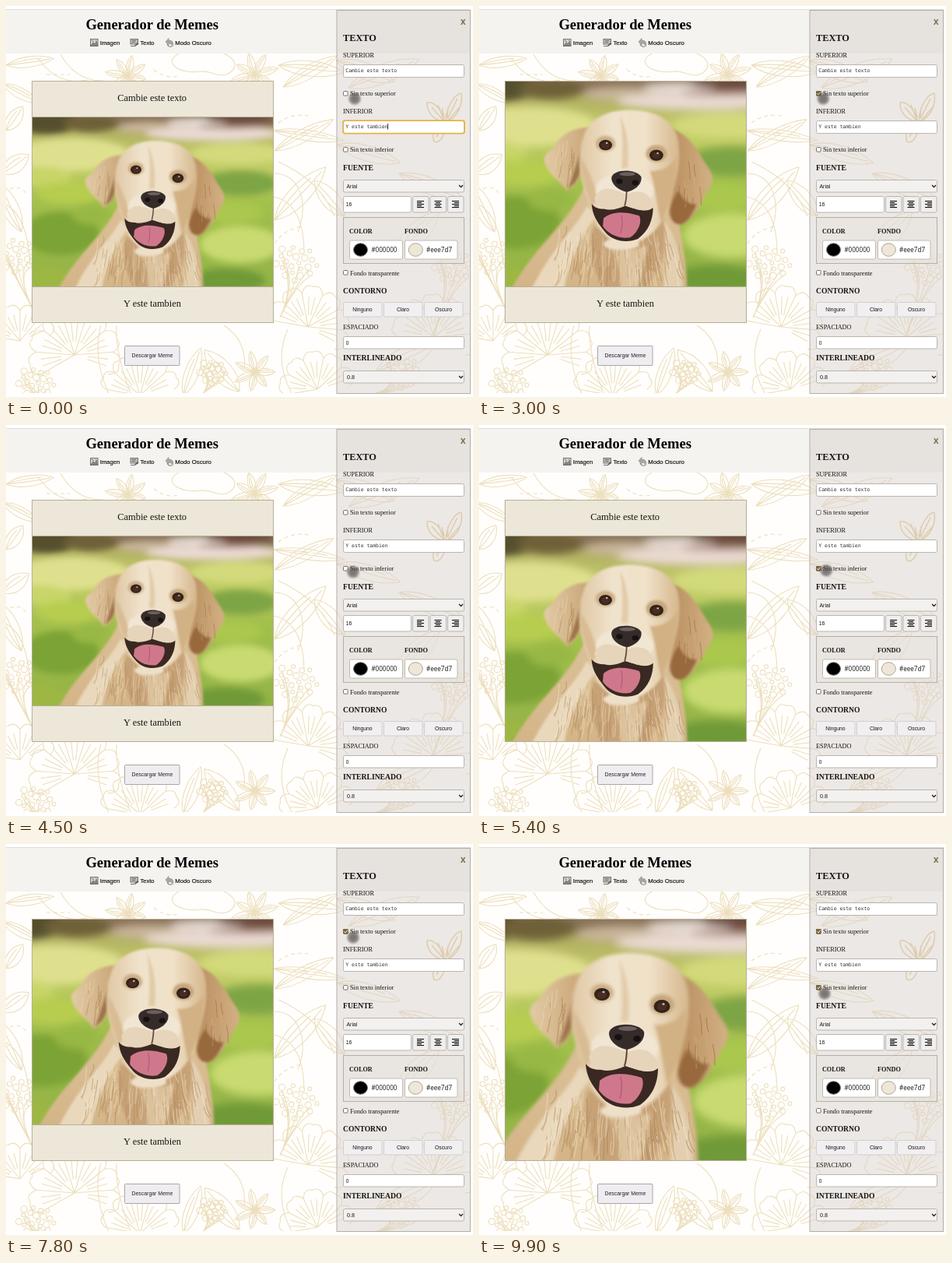
Recreate the animation shown at these times as an HTML page. Size 600 px wide and 502 px high, loop 10 s.

```html
<!DOCTYPE html>
<html lang="es">
<head>
<meta charset="utf-8">
<title>Generador de Memes</title>
<style>
html, body { margin: 0; width: 100%; height: 100%; overflow: hidden; background: #fff; }
#stage { display: block; width: 600px; height: 502px; }
.serif { font-family: "Liberation Serif", "Times New Roman", serif; }
.sans { font-family: "Liberation Sans", Arial, sans-serif; }
.mono { font-family: "DejaVu Sans Mono", monospace; }
.hex { font-family: "Open Sans", sans-serif; }
.wide { font-family: "DejaVu Sans", sans-serif; }
.bold { font-weight: bold; }
.mid { text-anchor: middle; }
</style>
</head>
<body>
<svg id="stage" viewBox="0 0 600 502" xmlns="http://www.w3.org/2000/svg"></svg>
<script>
const LOOP = 10000;
let seed = 11;
const rnd = () => (seed = (seed * 16807) % 2147483647) / 2147483647;
const fx = v => v.toFixed(1);

const text = (x, y, size, str, cls = "serif", fill = "#161514") =>
  `<text x="${x}" y="${y}" font-size="${size}" class="${cls}" fill="${fill}">${str}</text>`;
const box = (x, y, w, h, fill, line = "none", r = 0) =>
  `<rect x="${x}" y="${y}" width="${w}" height="${h}" rx="${r}" fill="${fill}" stroke="${line}"/>`;
const oval = (x, y, rx, ry, fill, more = "") =>
  `<ellipse cx="${x}" cy="${y}" rx="${rx}" ry="${ry}" fill="${fill}" ${more}/>`;
const path = (d, fill, more = "") => `<path d="${d}" fill="${fill}" ${more}/>`;

// ---- floral wallpaper -------------------------------------------------
function leaf(x, y, len, w, deg) {
  const a = deg * Math.PI / 180, c = Math.cos(a), s = Math.sin(a);
  const p = (u, v) => fx(x + u * c - v * s) + " " + fx(y + u * s + v * c);
  return `M${p(0, 0)}C${p(len * .25, -w)} ${p(len * .7, -w)} ${p(len, 0)}` +
    `C${p(len * .7, w)} ${p(len * .25, w)} ${p(0, 0)}Q${p(len * .5, w * .15)} ${p(len * .92, 0)}` +
    `M${p(0, 0)}Q${p(len * .4, -w * .5)} ${p(len * .75, -w * .25)}`;
}
function star(x, y, r, n, turn) {
  let d = "";
  for (let i = 0; i < n; i++) d += leaf(x, y, r * (.85 + .3 * rnd()), r * .22, turn + i * 360 / n);
  return d;
}
function ring(x, y, r) {
  return `M${fx(x - r)} ${fx(y)}a${r} ${r} 0 1 0 ${2 * r} 0a${r} ${r} 0 1 0 ${-2 * r} 0`;
}
function umbel(x, y, r, bx, by) {
  let d = "";
  for (let i = 0; i < 22; i++) {
    const q = r * Math.sqrt((i + .5) / 22), a = i * 2.4;
    const cx = x + q * Math.cos(a), cy = y + q * Math.sin(a) * .85;
    d += ring(cx, cy, 2.5 + (i % 3) * .8);
    if (i % 4 === 0) d += `M${fx(cx)} ${fx(cy + 4)}Q${x} ${y + r} ${bx} ${by}`;
  }
  return d;
}
function fan(x, y, r, from, to, n) {
  let d = "";
  const at = (deg, q) => fx(x + q * Math.cos(deg * Math.PI / 180)) + " " + fx(y + q * Math.sin(deg * Math.PI / 180));
  const step = (to - from) / n;
  for (let i = 0; i < n; i++) {
    const a = from + i * step;
    d += `M${x} ${y}L${at(a, r * .85)}Q${at(a + step * .2, r * 1.1)} ${at(a + step / 2, r)}` +
         `Q${at(a + step * .8, r * 1.1)} ${at(a + step, r * .85)}`;
    for (let k = 1; k < 3; k++) d += `M${at(a + step * k / 3, r * .3)}L${at(a + step * k / 3, r * .75)}`;
  }
  return d;
}
function wallpaper() {
  const leaves = [
    [0, 76, 62, 9, -8], [-4, 100, 52, 9, 28], [0, 160, 38, 12, -55], [-5, 215, 42, 14, -35],
    [345, 186, 86, 11, -28], [344, 160, 92, 9, 8], [356, 104, 80, 11, -30], [350, 76, 85, 13, 6],
    [425, 178, 85, 13, 16], [440, 105, 98, 16, -22], [345, 275, 95, 17, -46], [424, 70, 80, 14, 20],
    [505, 215, 90, 14, 22], [20, 290, 70, 14, -115], [500, 320, 80, 18, -45], [228, 500, 65, 12, -70],
    [300, 495, 70, 17, -130], [435, 270, 60, 15, -130], [475, 470, 85, 18, -25]
  ];
  let d = leaves.map(l => leaf(...l)).join("");
  d += star(157, 90, 27, 8, 10) + star(319, 88, 29, 8, 30) + star(320, 470, 27, 7, 0);
  d += umbel(12, 320, 27, 40, 400) + umbel(372, 330, 28, 352, 400) + umbel(38, 484, 24, 70, 502) +
       umbel(574, 335, 26, 545, 430) + umbel(508, 470, 25, 460, 500) + umbel(265, 470, 18, 250, 500);
  d += fan(88, 448, 58, 150, 390, 7) + fan(388, 412, 52, 190, 400, 6) + fan(172, 500, 52, 190, 350, 5) +
       fan(400, 492, 48, 170, 355, 5) + fan(550, 425, 54, 180, 390, 6) + fan(18, 430, 46, 190, 350, 4);
  d += "M222 61c-22 12 2 27 28 23 12-2 25 10 37 2s8-18-7-25M70 62q20 35 55 34M42 68q25 35 62 27" +
       "M345 215c32 0 45 38 30 75M350 200q55 25 72 70M344 245q38 8 39 70M0 255q28 15 31 78" +
       "M122 410q-12 42 12 92M142 410q-2 37 20 92M280 410q30 20 26 55M362 415q-18 40 5 82";
  const wings = "M563 147C560 131 548 122 541 124C541 136 547 145 563 149C552 153 546 164 550 174" +
    "C558 178 565 163 565 152M565 147C566 130 576 113 585 112C587 126 582 140 567 149" +
    "C577 147 585 153 582 160C575 166 567 159 566 151M563 143l-3-12M567 143l1-13" +
    "M562 147L547 130M562 145L555 127M567 145L580 119M568 147L583 130M563 152L553 168M568 151L578 157";
  const dash = "M52 88h30M190 82q15 12 32 8M350 150q20-14 42-8M345 305q12-18 35-22M5 235q15-6 22 8";
  return `<g fill="none" stroke="#eddfbd" stroke-width="1.1" stroke-linejoin="round">` +
    `<path d="${d}"/><path d="${dash}" stroke-dasharray="5 4"/>` +
    `<path d="${wings}" stroke="#e3cc95" stroke-width="1.5"/></g>`;
}

// ---- photo --------------------------------------------------------------
function strands(n, x0, y0, w, h, lean, colors) {
  let s = "";
  for (let i = 0; i < n; i++) {
    const x = x0 + rnd() * w, y = y0 + rnd() * h, l = 16 + rnd() * 26;
    s += path(`M${fx(x)} ${fx(y)}q${fx((rnd() - .5) * 8)} ${fx(l / 2)} ${fx((x - 175) * lean)} ${fx(l)}`, "none",
      `stroke="${colors[i % colors.length]}"`);
  }
  return s;
}
function photo() {
  const yard =
    box(-60, 90, 500, 325, "url(#grass)") +
    `<g filter="url(#far)">` +
    box(-60, 82, 500, 34, "#8a7359") + oval(-5, 104, 60, 24, "#55502f") + oval(75, 108, 50, 16, "#6e6138") +
    oval(185, 116, 60, 10, "#c9b69a") + oval(300, 127, 125, 13, "#eadad2") + oval(270, 107, 55, 7, "#e9ded6") +
    oval(350, 99, 65, 9, "#67453a") + oval(330, 114, 60, 4, "#9a7466") +
    oval(40, 165, 105, 30, "#dfe08e") + oval(-20, 205, 60, 18, "#c8d567") +
    oval(345, 163, 85, 19, "#d3da7c") + oval(350, 218, 70, 23, "#7ea545") +
    oval(35, 235, 60, 20, "#b7cd50") + oval(330, 272, 60, 20, "#aac84e") +
    oval(20, 310, 70, 40, "#7ba336") + oval(350, 330, 75, 34, "#c8da70") +
    oval(75, 275, 35, 18, "#98b844") + oval(325, 396, 70, 22, "#6f9a37") + oval(-20, 392, 55, 25, "#9cb743") +
    `</g>`;
  const coat =
    `<g filter="url(#near)">` +
    path("M128 252C112 292 78 325 48 362Q30 384 14 414H281C283 380 273 330 264 285L200 250Z", "url(#coat)") +
    path("M130 285C112 322 75 350 45 414H95C100 370 125 320 146 300Z", "#e9d8bb") +
    path("M140 315C130 355 140 390 160 412H215C250 380 250 335 246 300Q200 350 140 315Z", "#c7a277") +
    path("M165 345Q185 385 180 412H205Q220 375 220 345Q190 358 165 345Z", "#dcc29c") +
    path("M246 305Q275 345 275 412H245Q254 360 246 305Z", "#e3cfb0") +
    path("M137 166C106 166 87 180 79 198C68 204 62 212 67 222C74 241 89 246 99 262C113 258 126 235 131 210Z", "url(#earL)") +
    path("M257 168C285 176 299 204 312 225C323 241 322 249 312 264C300 287 286 313 270 314C252 312 250 286 257 262C264 230 258 200 257 168Z", "url(#earR)") +
    path("M124 190Q128 225 112 250L101 260Q112 228 124 190Z", "#9f7449") +
    path("M268 262Q280 285 296 282Q284 312 270 313C252 312 252 286 268 262Z", "#98693d") +
    `</g>` +
    `<g stroke-width="1.3" fill="none" opacity=".5" filter="url(#soft)">` +
    strands(150, 85, 315, 185, 70, .08, ["#f4e7d0", "#a77f51", "#ead7b8", "#bd9464"]) +
    strands(14, 268, 205, 36, 70, .02, ["#986a3b", "#d2aa78"]) +
    strands(12, 82, 185, 34, 40, .05, ["#a67b4b", "#eed8b8"]) + `</g>`;
  const face =
    `<g filter="url(#near)">` +
    path("M127 173C140 149 165 139 200 140C235 142 262 155 268 185C274 220 264 250 255 285C246 312 225 338 190 345C160 340 142 318 135 285C121 255 115 225 120 195Z", "url(#face)") +
    path("M180 148Q196 180 192 228H182Q186 185 180 148Z", "#e2cba8") +
    path("M225 232C245 234 262 222 265 208C268 250 255 285 242 310C234 276 233 252 225 232Z", "#d2b184") +
    path("M121 212Q138 238 146 272L138 288Q119 240 121 212Z", "#d9bc93") +
    oval(187, 262, 44, 27, "#f1e6d3") + oval(182, 343, 27, 9, "#eee0c8") +
    oval(158, 191, 15, 12, "#cdae86") + oval(235, 206, 16, 13, "#c6a67c") +
    `</g><g filter="url(#soft)">` +
    path("M137 282C146 294 162 290 186 284C206 291 220 296 230 288C230 306 223 324 207 335C190 342 168 339 156 323C144 308 138 298 137 282Z", "#3a2822") +
    path("M155 304C168 292 190 294 209 300C214 309 207 326 195 333C178 336 161 327 154 316Z", "#cf788c") +
    path("M182 299Q185 312 181 327", "none", 'stroke="#b35c74" stroke-width="1.5"') +
    path("M141 274C150 254 166 257 190 268C215 257 228 270 231 286C216 297 203 289 188 285C170 293 150 296 141 274Z", "#e6d5ba") +
    path("M190 260Q190 275 187 285", "none", 'stroke="#604638" stroke-width="2"') +
    path("M167 243C168 229 204 228 212 241C214 253 201 262 190 264C178 262 167 253 167 243Z", "#352c2a") +
    oval(191, 237, 12, 3, "#6b605d") + oval(179, 248, 5, 4, "#171212") + oval(203, 250, 5, 4, "#171212") +
    oval(158, 193, 10, 8, "#33231b") + oval(235, 208.5, 10.5, 8.5, "#33231b") +
    oval(158, 194, 6, 5, "#482d20") + oval(235, 209, 6, 5, "#482d20") +
    oval(160, 190, 1.6, 1.3, "#c9c5c1") + oval(237, 205.5, 1.6, 1.3, "#c9c5c1") + `</g>`;
  return yard + coat + face;
}
const fade = (id, dir, ...stops) => `<linearGradient id="${id}" ${dir}>` +
  stops.map((c, i) => `<stop offset="${i / (stops.length - 1)}" stop-color="${c}"/>`).join("") + `</linearGradient>`;
const down = 'x1="0" y1="0" x2="0" y2="1"', across = 'x1="0" y1="0" x2="1" y2="0"';
const blur = (id, n) => `<filter id="${id}" x="-20%" y="-20%" width="140%" height="140%"><feGaussianBlur stdDeviation="${n}"/></filter>`;
const defs = "<defs>" +
  fade("grass", down, "#a39a5c", "#c6cf6b", "#a4c04c", "#98b848", "#94b347") +
  fade("coat", down, "#dbbf97", "#d8bb90", "#d3b487") +
  fade("face", across, "#dfc7a3", "#f0e3cc", "#f0e1c8", "#d5b78c") +
  fade("earL", across, "#e3cba6", "#c7a273") + fade("earR", across, "#b78c5d", "#d3b184") +
  blur("far", 6) + blur("near", 2) + blur("soft", .7) + blur("dot", .9) +
  '<clipPath id="page"><rect x="0" y="61" width="597" height="436"/></clipPath></defs>';

// ---- page and panel -----------------------------------------------------
const chevron = y => path(`M582 ${y}l2.5 2.5l2.5-2.5`, "none", 'stroke="#222" stroke-width="1.3"');
const band = (id, y) => `<g id="${id}">${box(33.5, y + .5, 310, 46, "#ece7d8", "#b8ae95")}`;
const tick = (id, y) => box(433.5, y + .5, 5.6, 5.6, "#fff", "#77736f", 1) +
  `<g id="${id}">${box(433, y, 6.6, 6.6, "#76663f", "none", 1)}` +
  path(`M434.4 ${y + 3.4}l1.5 1.5l2.6-3.2`, "none", 'stroke="#fff" stroke-width="1"') + "</g>";

function align(x, mode) {
  let s = box(x + .5, 244.5, 20.5, 20.5, "#f1efee", "#b9b5b2", 2);
  for (let i = 0; i < 5; i++) {
    const w = i % 2 ? 6 : 9;
    s += box(x + 6 + [0, (9 - w) / 2, 9 - w][mode], 250 + i * 2, w, 1.1, "#111");
  }
  return s;
}
function header() {
  const g = 'stroke="#77736e" stroke-width="1"';
  return box(0, 4, 597, 57, "#f4f3ef") + box(0, 4, 597, 1, "#dedddb") +
    text(187.7, 29.5, 18.55, "Generador de Memes", "serif bold mid", "#000") +
    `<rect x="108.5" y="42.5" width="9.5" height="9" fill="#d6d3cf" ${g}/>` +
    path("M109 51l3-4l2 2l2-3l2 5zM110 44l3 2M115 44l2 2", "#8b8782", g) +
    `<rect x="160" y="42.5" width="9.5" height="6.5" fill="#bdb9b5" ${g}/>` +
    path("M162 44.5h5M162 46.5h4M160 51.5h6", "none", g) + path("M165 51l4-4l1.5 1.5l-4 3z", "#5d5955") +
    path("M205 46l4-4.5v2.6c5 0 7 3 5 8c-1-3-2-4-5-4v2.5z", "#aaa5a0", 'stroke="#8c8782" stroke-width=".6"') +
    path("M207 49q1 4 6 3", "none", g) +
    `<g stroke="#161514" stroke-width=".18">` +
    text(120.8, 50, 7.65, "Imagen", "sans") + text(172.5, 50, 7.5, "Texto", "sans") +
    text(217.3, 50, 7.75, "Modo Oscuro", "sans") + "</g>";
}
function panel() {
  const edge = "#bab5af", soft = "#f3f1ef";
  return box(425, 5.5, 171.5, 492, "rgba(213,206,200,.46)", "#b3ada5") +
    text(587.2, 23.8, 9, "X", "wide bold mid", "#7b7152") +
    text(433, 45, 12.3, "TEXTO", "serif bold") +
    text(433, 66.3, 8.27, "SUPERIOR") + box(433.5, 75.5, 155, 16, "#fff", edge, 2) +
    text(436.3, 85, 6.45, "Cambie este texto", "mono", "#333") +
    tick("tickTop", 109) + text(442, 115.3, 8.25, "Sin texto superior") +
    text(433, 138.3, 8.25, "INFERIOR") + box(433.5, 147.5, 155, 16, "#fff", edge, 2) +
    `<rect id="focus" x="433" y="147.2" width="156" height="16.4" rx="2.5" fill="none" stroke="#e5b443" stroke-width="1.8"/>` +
    text(436.3, 157, 6.45, "Y este tambien", "mono", "#333") +
    `<rect id="caret" x="490.3" y="151" width=".8" height="7.5" fill="#111"/>` +
    tick("tickBottom", 181) + text(442, 187.3, 8.25, "Sin texto inferior") +
    text(433, 211, 9.65, "FUENTE", "serif bold") +
    box(433.5, 223.5, 155, 15.5, soft, edge, 2) + text(437.5, 234, 6.9, "Arial", "sans") + chevron(230) +
    box(433.5, 244.5, 87, 20.5, "#fff", edge, 2) + text(436.7, 257.3, 6.9, "16", "sans") +
    align(522, 0) + align(544.5, 1) + align(567, 2) +
    box(433.5, 271.5, 155, 59, "rgba(232,227,220,.5)", "#b5afa7") +
    text(441, 291.5, 8.1, "COLOR", "serif bold") + text(512, 291.5, 8.3, "FONDO", "serif bold") +
    box(441.5, 301, 68, 24, "#fff", "#c1bab2", 2) + box(512.5, 301, 67.5, 24, "#fff", "#c1bab2", 2) +
    oval(455.5, 313, 9, 8.3, "#000", 'stroke="#777"') + oval(526.3, 313, 9, 8.3, "#eee7d7", 'stroke="#aaa59a"') +
    text(469.4, 316.2, 8.1, "#000000", "hex") + text(540, 316.2, 8.1, "#eee7d7", "hex") +
    box(433.5, 339.5, 5.6, 5.6, "#fff", "#77736f", 1) + text(442, 345.7, 8.25, "Fondo transparente") +
    text(433, 369, 9.65, "CONTORNO", "serif bold") +
    ["Ninguno", "Claro", "Oscuro"].map((s, i) =>
      box(433.5 + i * 52, 380.5, 49.5, 18.5, "#f1eff0", "#d2cfd2", 1) +
      text(458 + i * 52, 392.2, 6.8, s, "sans mid")).join("") +
    text(433, 415.3, 8.25, "ESPACIADO") + box(433.5, 424.5, 155, 15.5, "#fff", edge, 2) +
    text(436.7, 434.6, 6.5, "0", "sans") +
    text(433, 455, 9.65, "INTERLINEADO", "serif bold") +
    box(433.5, 468.5, 155, 15.5, soft, edge, 2) + text(438, 479, 7.2, "0.8", "sans") + chevron(475);
}

const $ = id => document.getElementById(id);
$("stage").innerHTML = defs + box(0, 0, 600, 502, "#fff") + box(0, 61, 597, 436, "#fffefc") +
  `<g clip-path="url(#page)">${wallpaper()}</g>` + header() +
  `<svg id="photo" x="33" y="97" width="310" height="310" viewBox="33 97 310 310" overflow="hidden">${photo()}</svg>` +
  band("top", 96) + text(187.7, 122.3, 12.4, "Cambie este texto", "serif mid") + "</g>" +
  band("bottom", 360) + text(188, 385.5, 12.4, "Y este tambien", "serif mid") + "</g>" +
  box(33.5, 96.5, 310, 310, "none", "#b8ae95") +
  box(152.5, 436.5, 70.5, 25, "#efedf0", "#aaa6a8", 1) + text(188, 451.3, 6.9, "Descargar Meme", "sans mid", "#26202c") +
  panel() + `<g id="pointer" filter="url(#dot)">${oval(0, 0, 7.8, 7.8, "#55514f", 'opacity=".55"')}${oval(0, 0, 5, 5, "#504c4a", 'opacity=".4"')}</g>`;

// ---- motion ---------------------------------------------------------------
const route = [
  [0, 448, 119], [1000, 444, 118], [1400, 443, 118.5], [3600, 442, 119], [3800, 445, 124],
  [4050, 452, 155], [4400, 446, 189], [4800, 446, 187], [6400, 447, 186], [6700, 456, 155],
  [7100, 446, 120], [8100, 446, 120], [8600, 445, 190], [9100, 444, 192], [LOOP, 444, 192]
];
function pointerAt(t) {
  const i = Math.max(1, route.findIndex(p => p[0] > t));
  const a = route[i - 1], b = route[i], k = (t - a[0]) / (b[0] - a[0]), e = k * k * (3 - 2 * k);
  return [a[1] + (b[1] - a[1]) * e, a[2] + (b[2] - a[2]) * e];
}
const between = (t, a, b) => t >= a && t < b;
const show = (id, on) => $(id).setAttribute("visibility", on ? "visible" : "hidden");

function draw(now) {
  const t = Math.floor((now % LOOP) / 100) * 100;
  const noTop = between(t, 1400, 3600) || t >= 7300;
  const noBottom = between(t, 4900, 6000) || t >= 8800;
  const focused = t < 1300;
  show("top", !noTop);
  show("bottom", !noBottom);
  show("tickTop", noTop);
  show("tickBottom", noBottom);
  show("focus", focused);
  show("caret", focused && t % 1000 < 500);
  const y = noTop ? 97 : 143, end = noBottom ? 407 : 360;
  $("photo").setAttribute("y", y);
  $("photo").setAttribute("height", end - y);
  $("pointer").setAttribute("transform", `translate(${pointerAt(t).map(fx)})`);
}
const start = performance.now();
function play() {
  draw(performance.now() - start);
  requestAnimationFrame(play);
}
play();
</script>
</body>
</html>
```
